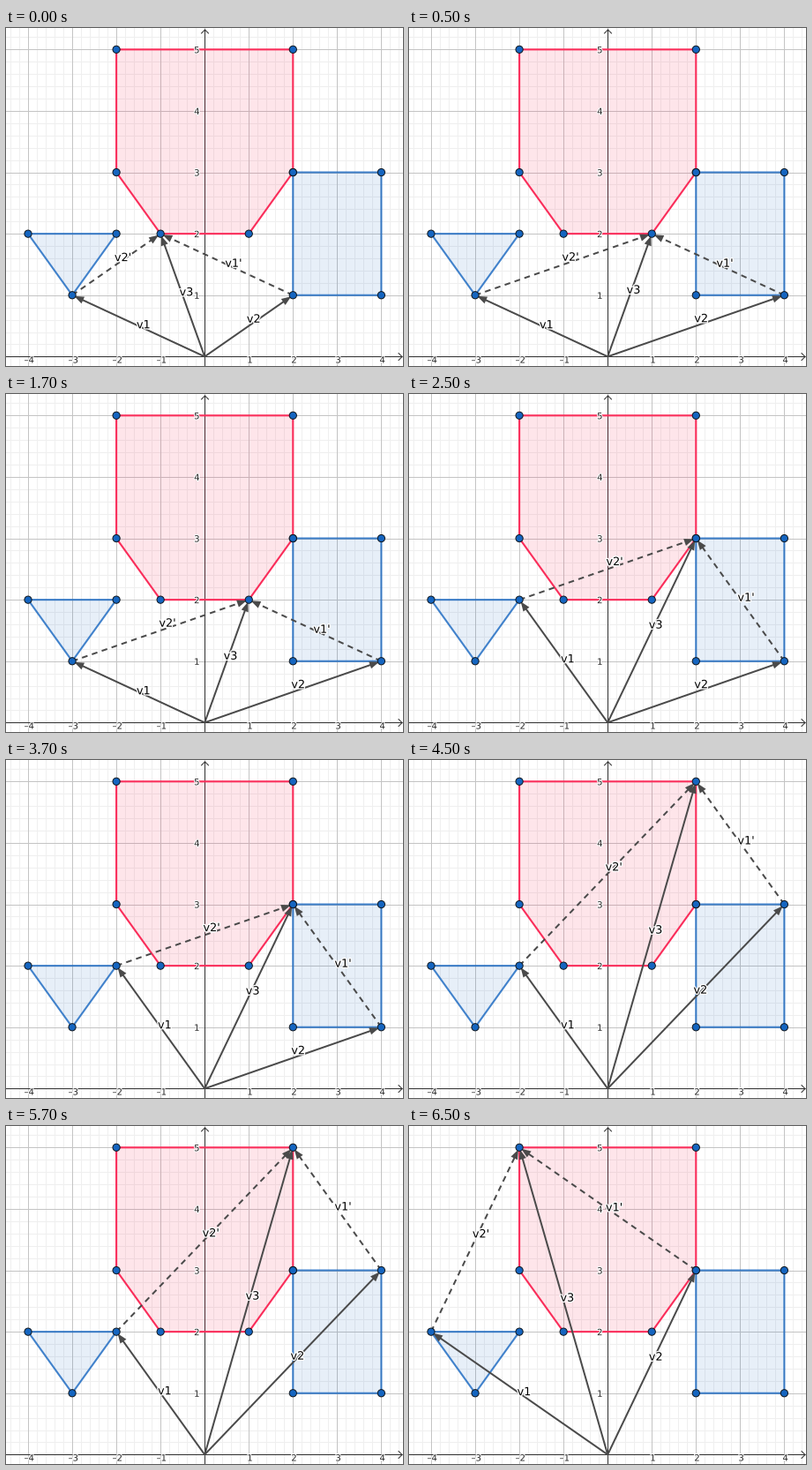
Recreate the animation shown at these times as a matplotlib script. Size 450 by 383 pixels, loop 8 s.

```python
import numpy as np
import matplotlib.pyplot as plt
from matplotlib.animation import FuncAnimation
from matplotlib.patches import Circle, Polygon
from matplotlib.patheffects import withStroke

W, H = 450, 383
ORIGIN = np.array([225.2, 372.35])
UNIT = np.array([50.05, -69.6])
BLUE, PINK, DARK = "#1565c0", "#fa2d5a", "#4a4a4a"

TRIANGLE = [(-4, 2), (-3, 1), (-2, 2)]
RECTANGLE = [(2, 1), (4, 1), (4, 3), (2, 3)]
SUM = [(-1, 2), (1, 2), (2, 3), (2, 5), (-2, 5), (-2, 3)]

# Matching vertices (v1, v2) whose sums walk around the pink polygon
POSES = [((-3, 1), (2, 1)), ((-3, 1), (4, 1)), ((-2, 2), (4, 1)),
         ((-2, 2), (4, 3)), ((-4, 2), (2, 3))]

plt.rcParams["font.family"] = "DejaVu Sans"
plt.rcParams["path.snap"] = False
# At 72 dpi one point is one pixel; the small excess guards against truncation
fig = plt.figure(figsize=(W / 72, (H + 0.01) / 72), dpi=72, facecolor="white")
ax = fig.add_axes([0, 0, 1, 1])
ax.set(xlim=(0, W), ylim=(H, 0))
ax.axis("off")


def px(point):
    return ORIGIN + UNIT * np.asarray(point, float)


def crisp(value):
    return np.round(value) + 0.5


def label(x, y, text, size, color, halo, zorder):
    return ax.text(x, y, text, size=size, color=color, ha="center",
                   va="center_baseline", zorder=zorder,
                   path_effects=[withStroke(linewidth=halo, foreground="white")])


def draw_grid():
    for axis_line, axis, steps in ((ax.axvline, 0, range(-23, 24)),
                                   (ax.axhline, 1, range(-1, 28))):
        for i in steps:
            at = crisp(ORIGIN[axis] + UNIT[axis] * i / 5)
            major = i % 5 == 0
            axis_line(at, color="#c4c4c4" if major else "#efefef", lw=1,
                      zorder=0.5 if major else 0)


def draw_axes():
    x0, y0 = crisp(ORIGIN)
    style = dict(color="#303030", lw=1, zorder=1)
    ax.plot([0, W - 1], [y0, y0], **style)
    ax.plot([x0, x0], [H, 2], **style)
    ax.plot([W - 5, W - 1, W - 5], [y0 - 4, y0, y0 + 4], **style)
    ax.plot([x0 - 4, x0, x0 + 4], [6, 2, 6], **style)
    for i in range(-4, 5):
        if i:
            text = str(i).replace("-", "–")
            label(px((i, 0))[0] + 1.2, 375.5, text, 10, "#252525", 2, 4)
    for i in range(1, 6):
        label(216.3, px((0, i))[1], str(i), 10, "#252525", 2, 4)


def draw_polygon(vertices, color, edge_alpha, fill_alpha):
    points = [px(v) for v in vertices]
    ax.add_patch(Polygon(points, fc=color, alpha=fill_alpha, lw=0, zorder=2))
    ax.add_patch(Polygon(points, fill=False, ec=color, alpha=edge_alpha,
                         lw=2.1, zorder=3))
    for point in points:
        ax.add_patch(Circle(point, 4.1, fc=BLUE, ec="#101820", lw=1, zorder=7))


class Arrow:
    def __init__(self, name, dashed=False):
        # Dash lengths are multiples of the line width
        style = (0, (3.3, 2.6)) if dashed else "-"
        self.prime = 2 if dashed else 0
        self.line, = ax.plot([], [], color=DARK, lw=2, ls=style,
                             dash_capstyle="butt", solid_capstyle="butt", zorder=5)
        self.head = ax.add_patch(Polygon(np.zeros((3, 2)), fc=DARK, lw=0, zorder=6))
        self.text = label(0, 0, name, 12.8, "black", 2.6, 8)

    def place(self, start, end):
        a, b = px(start), px(end)
        u = (b - a) / np.hypot(*(b - a))
        normal = np.array([-u[1], u[0]])
        tip = b - 2.5 * u
        base = tip - 11 * u
        self.line.set_data(*np.transpose([a, base + u]))
        self.head.set_xy([tip, base + 4.2 * normal, base - 4.2 * normal])
        offset = (4 + 2 * u[0] ** 2 + self.prime, -5.7 - 3.8 * u[0])
        self.text.set_position((a + b) / 2 + offset)


draw_grid()
draw_axes()
draw_polygon(TRIANGLE, BLUE, 0.8, 0.1)
draw_polygon(RECTANGLE, BLUE, 0.8, 0.1)
draw_polygon(SUM, PINK, 1, 0.12)
v1, v2, v3 = Arrow("v1"), Arrow("v2"), Arrow("v3")
v1_moved, v2_moved = Arrow("v1'", dashed=True), Arrow("v2'", dashed=True)


def update(step):
    a, b = POSES[(step + 3) // 4]
    total = np.add(a, b)
    v1.place((0, 0), a)
    v2.place((0, 0), b)
    v3.place((0, 0), total)
    v1_moved.place(b, total)
    v2_moved.place(a, total)
    return []


anim = FuncAnimation(fig, update, frames=16, interval=500, repeat=True,
                     repeat_delay=0, blit=False)
plt.show()
```
